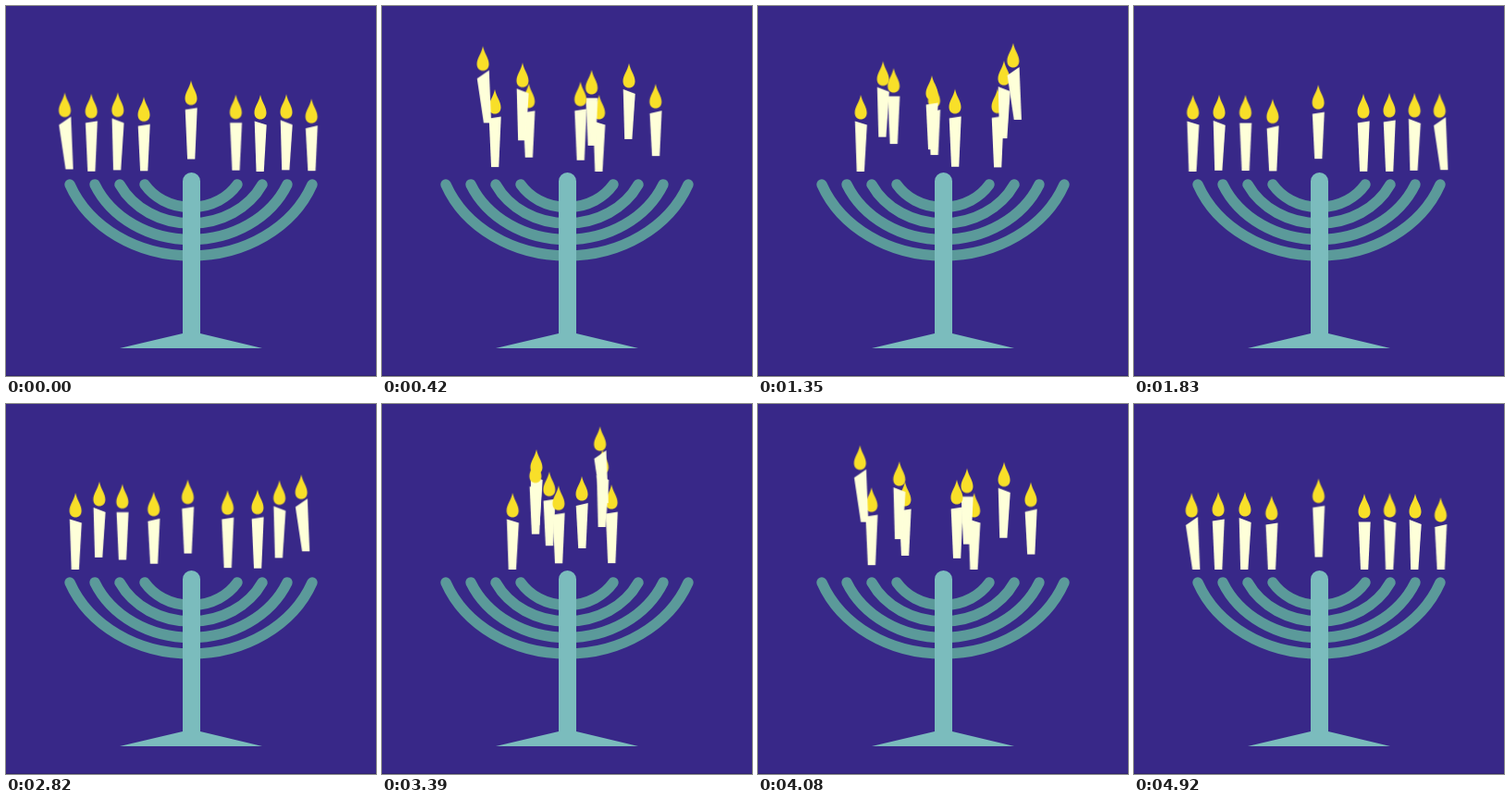
An HTML page for the animation above (4.95 s loop, 400x400 px).

```html
<!DOCTYPE html>
<html lang="en">
<head>
<meta charset="utf-8">
<title>Shuffling candles</title>
<style>
html, body { margin: 0; width: 100%; height: 100%; overflow: hidden; background: #382888; }
svg { display: block; width: 100vw; height: 100vh; }

.arms { fill: none; stroke: #5b9a9a; stroke-width: 11.5; stroke-linecap: round; }
.stand { fill: #7bbcbd; }
.wax { fill: #feffd9; }
.flame { fill: #f8df29; }

.slide { animation: slide 4950ms cubic-bezier(.36, .22, .64, .78) -20ms infinite; }
.slide.high { animation-timing-function: cubic-bezier(.36, .144, .64, .856); }
.lift { animation: lift 4950ms -20ms infinite; }

/* swap to the second place, rest, and swap back */
@keyframes slide {
  0%, 91.92%, 100% { transform: translate(var(--x0), var(--y0)); }
  37.78%, 54.14% { transform: translate(var(--x1), var(--y1)); }
}
/* one sine-shaped hop per swap */
@keyframes lift {
  0%, 54.14% { transform: translateY(0); animation-timing-function: cubic-bezier(.39, .575, .565, 1); }
  18.89%, 73.03% { transform: translateY(var(--hop)); animation-timing-function: cubic-bezier(.47, 0, .745, .715); }
  37.78%, 91.92%, 100% { transform: translateY(0); }
}
</style>
</head>
<body>
<svg viewBox="0 0 400 400">
  <rect width="400" height="400" fill="#382888"/>
  <rect y="399" width="400" height="1" fill="#30236f"/>
  <g class="arms" id="arms"></g>
  <path class="stand" d="M123 370L191 354V189.500A9.500 9.500 0 0 1 210 189.500V354L277 370Z"/>
  <g id="candles"></g>
</svg>
<script>
const FLAME = "M0 0C1.5 8 6.5 13 6.5 19.5C6.5 24 3.5 26.5 0 26.5S-6.5 24 -6.5 19.5C-6.5 13 -1.5 8 0 0Z";

// to: place after the swap; hop: height of the jump;
// slant: drop of the cut top from left to right; size: flame tip to foot
const candles = [
  { to: 8, hop: 75, slant: -9, size: 83 },
  { to: 5, hop: 7, slant: -2, size: 84 },
  { to: 7, hop: 48, slant: 5, size: 84 },
  { to: 4, hop: 18, slant: -2, size: 80 },
  { to: 6, hop: 2, slant: -2, size: 85 },
  { to: 2, hop: 40, slant: 0, size: 82 },
  { to: 0, hop: 0, slant: 4, size: 83 },
  { to: 1, hop: 50, slant: 5, size: 82 },
  { to: 3, hop: 24, slant: -3, size: 78 }
];

// nine places, the middle one set apart and higher
function place(i) {
  const d = i - 4;
  const step = d < 0 ? 28.8 : 27.5;
  return { x: 199.5 + 22 * Math.sign(d) + d * step, floor: d ? 179 : 165.5 };
}

function arm(i) {
  const half = 131 - 27 * i;
  const depth = 77 - 17.5 * i;
  const rx = half + 9;
  const ry = depth / (1 - Math.sqrt(1 - (half / rx) ** 2));
  return `<path d="M${200 - half} 193A${rx} ${ry} 0 0 0 ${200 + half} 193"/>`;
}

function candle({ to, hop, slant, size }, i) {
  const a = place(i), b = place(to);
  const foot = -(slant ** 3) / 150; // steep cuts lean away
  const wax = [-6.3, 30.5 - slant / 2, 6.7, 30.5 + slant / 2, foot + 4.2, size, foot - 4, size];
  const vars = `--x0:${a.x}px;--y0:${a.floor - size}px;--x1:${b.x}px;--y1:${b.floor - size}px;--hop:${-hop}px`;
  return `<g class="slide ${hop > 30 ? "high" : ""}" style="${vars}"><g class="lift">
    <polygon class="wax" points="${wax}"/><path class="flame" d="${FLAME}"/></g></g>`;
}

document.getElementById("arms").innerHTML = [0, 1, 2, 3].map(arm).join("");
// the first candle lies on top
document.getElementById("candles").innerHTML = candles.map(candle).reverse().join("");
</script>
</body>
</html>
```
